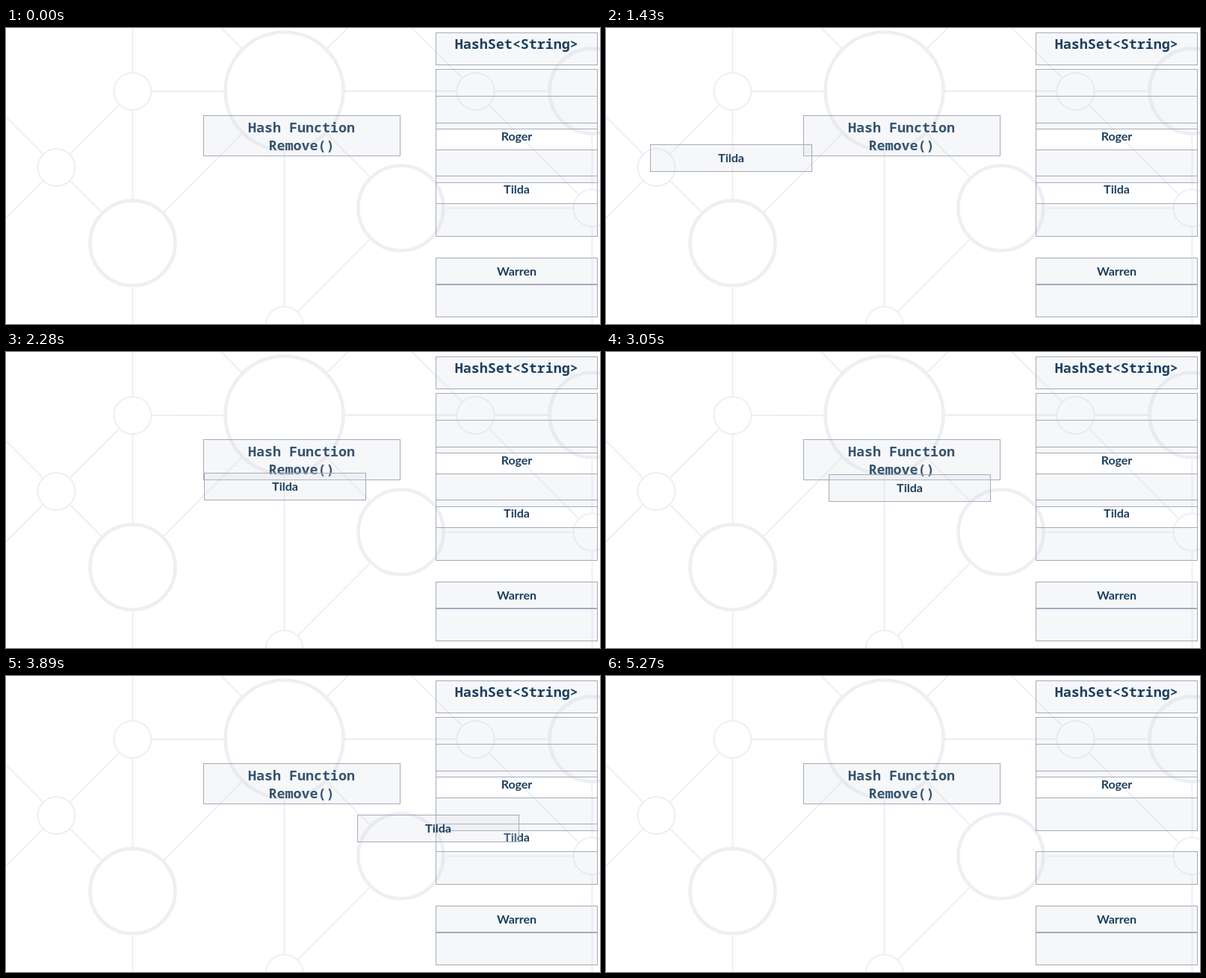
An HTML page for the animation above (6450 ms loop, 795 px wide and 397 px high).

```html
<!DOCTYPE html>
<html lang="en">
<head>
<meta charset="utf-8">
<title>HashSet remove</title>
<style>
  html, body { margin: 0; width: 100%; height: 100%; overflow: hidden; background: #fff; }
  svg { display: block; }
  .net { stroke: #eeeff2; fill: #fff; }
  .box { stroke: #a5aaba; fill: rgba(210, 214, 226, .2); }
  .open { fill: none; }
  text { fill: #1b3f5e; text-anchor: middle; font-weight: 700; white-space: pre; }
  .code { font-family: "Noto Sans Mono", "DejaVu Sans Mono", monospace; font-size: 18.33px; }
  .soft { fill: #35546f; }
  .name { font-family: Lato, "Open Sans", sans-serif; font-size: 16px; }
</style>
</head>
<body>
<svg id="stage" width="795" height="397" viewBox="0 0 795 397"><defs id="defs"></defs></svg>
<script>
const LOOP = 6450, START = 430, END = 5266, TICK = 1000 / 13;
const SOFT = 30, BOX_W = 216, BOX_H = 36;
const TABLE_X = 575.5, TABLE_Y = 55.5;
const stage = document.getElementById('stage');
const defs = document.getElementById('defs');

function add(parent, tag, attrs, label) {
  const el = document.createElementNS('http://www.w3.org/2000/svg', tag);
  for (const key in attrs) el.setAttribute(key, attrs[key]);
  if (label) el.textContent = label;
  parent.appendChild(el);
  return el;
}
const box = (parent, x, y, width, height, cls = 'box') =>
  add(parent, 'rect', { x, y, width, height, class: cls });
const label = (parent, x, y, cls, str) => add(parent, 'text', { x, y, class: cls }, str);

function nameBox(parent, x, y, str, cls, h = BOX_H) {
  box(parent, x, y, BOX_W, h, cls);
  label(parent, x + BOX_W / 2, y + 23.5, 'name', str);
}

// A mask with one soft vertical edge; returns a function that moves the edge.
function wipeMask(id, left, right) {
  const fade = add(defs, 'linearGradient', { id: id + 'Fade', gradientUnits: 'userSpaceOnUse' });
  add(fade, 'stop', { offset: 0, 'stop-color': left });
  add(fade, 'stop', { offset: 1, 'stop-color': right });
  const size = { x: 0, y: 0, width: 795, height: 397 };
  const mask = add(defs, 'mask', { id, maskUnits: 'userSpaceOnUse', ...size });
  add(mask, 'rect', { ...size, fill: `url(#${id}Fade)` });
  return (x, p) => {
    const edge = x - SOFT + p * (BOX_W + SOFT + 2);
    fade.setAttribute('x1', edge);
    fade.setAttribute('x2', edge + SOFT);
  };
}
const wipeIn = wipeMask('enter', '#fff', '#000');
const wipeOut = wipeMask('leave', '#000', '#fff');

// Network: nodes that share a row, column or diagonal are linked.
const node = (x, y, r) => ({ x, y, r });
const west = node(67.5, 187, 25), north = node(169.5, 85, 25), south = node(169.5, 288.5, 57);
const hub = node(372.5, 84.5, 79), mid = node(528.5, 241.5, 57), base = node(372.5, 398.5, 25);
const top2 = node(628.5, 85, 25), east = node(784.5, 241.5, 25), corner = node(784.5, 84.5, 57);
const nodes = [west, north, south, hub, mid, base, top2, east, corner];

const net = add(stage, 'g', { class: 'net' });
const link = (a, b) =>
  add(net, 'line', { x1: a.x, y1: a.y, x2: b.x, y2: b.y, 'stroke-width': 2 });
const ray = (a, dx, dy) => link(a, { x: a.x + 160 * dx, y: a.y + 160 * dy });

nodes.forEach((a, i) => nodes.slice(i + 1).forEach(b => {
  const dx = Math.abs(a.x - b.x), dy = Math.abs(a.y - b.y);
  if (Math.min(dx, dy, Math.abs(dx - dy)) < 2) link(a, b);
}));
for (const a of [west, hub, top2]) ray(a, -1, -1);
for (const a of [south, east]) ray(a, 0, 1);
ray(west, -1, 1);
ray(hub, 1, -1);
ray(north, 0, -1);
for (const { x, y, r } of nodes)
  add(net, 'circle', { cx: x, cy: y, r, 'stroke-width': r > 25 ? 4.7 : 2 });

// Hash function
box(stage, 264.5, 117.5, 263, 54);
label(stage, 395.5, 140, 'code soft', 'Hash Function');
label(stage, 395.5, 164, 'code soft', 'Remove()');

// Table
box(stage, TABLE_X, 6.5, BOX_W, 43);
label(stage, 683.2, 28, 'code', 'HashSet<String>');
const rowY = k => TABLE_Y + BOX_H * k;
box(stage, TABLE_X, rowY(0), BOX_W, BOX_H);
for (const k of [1, 3, 5]) box(stage, TABLE_X, rowY(k), BOX_W, 44);
box(stage, TABLE_X, rowY(8) + 1, BOX_W, 43);
nameBox(stage, TABLE_X, rowY(2), 'Roger', 'box open');
nameBox(stage, TABLE_X, rowY(7) + 1, 'Warren', 'box', 35);
const entry = add(stage, 'g', {});
nameBox(entry, TABLE_X, rowY(4) - 1, 'Tilda', 'box open', 37);

// Travelling box
const wrap = add(stage, 'g', {});
const mover = add(wrap, 'g', {});
nameBox(mover, 0, 0, 'Tilda');

const ease = p => p < .5 ? 2 * p * p : 1 - 2 * (1 - p) ** 2;
const span = (t, from, length) => Math.max(0, Math.min(1, (t - from) / length));
const snap = v => Math.floor(v) + .5;

const STOPS = [[15.5, 155.2], [295.2, 163.7], [575.7, 199.5]];
const MOVE = 1723;

function place(t) {
  const a = ease(span(t, 947, MOVE)), b = ease(span(t, 2915, MOVE));
  const [from, via, to] = STOPS;
  return from.map((v, i) => snap(v + a * (via[i] - v) + b * (to[i] - via[i])));
}

function setMask(el, id) {
  if (id) el.setAttribute('mask', `url(#${id})`);
  else el.removeAttribute('mask');
}

function draw(now) {
  const raw = now % LOOP;
  const step = Math.floor((raw - START + 6) / TICK);
  const t = START + step * TICK;
  const enter = span(t, 400, 550), leave = span(t, 4634, 636);
  const gone = raw >= END;

  mover.setAttribute('transform', `translate(${place(t)})`);
  wipeIn(STOPS[0][0], enter);
  wipeOut(TABLE_X, leave);
  setMask(wrap, enter < 1 ? 'enter' : leave > 0 ? 'leave' : '');
  setMask(entry, leave > 0 ? 'leave' : '');
  wrap.style.display = step < 0 || gone ? 'none' : '';
  entry.style.display = gone ? 'none' : '';
}

const origin = performance.now();
function frame() {
  draw(performance.now() - origin);
  requestAnimationFrame(frame);
}
frame();
</script>
</body>
</html>
```
